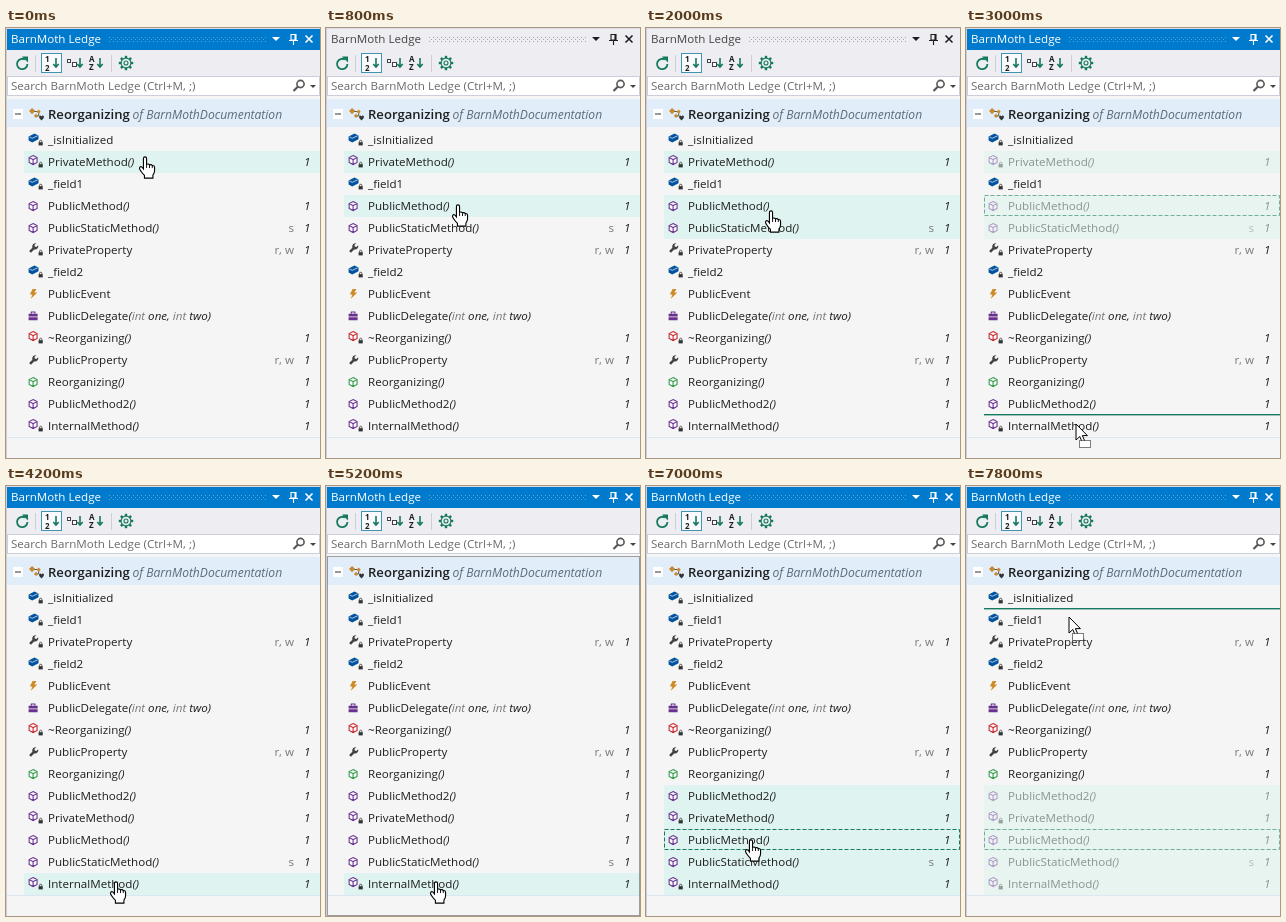
An HTML page for the animation above (8 s loop, 314 by 430 pixels).

```html
<!DOCTYPE html>
<html lang="en">
<head>
<meta charset="utf-8">
<title>Member list</title>
<style>
html, body { margin: 0; width: 100%; height: 100%; overflow: hidden; background: #f5f5f5; }
svg { display: block; width: 100%; height: 100%; }
text { font: 11.6px "Open Sans", sans-serif; fill: #1e1e1e; white-space: pre; }
.i { font-style: italic; }
.type { fill: #777; }
.mid { text-anchor: end; fill: #777; }
</style>
</head>
<body>
<svg id="stage" viewBox="0 0 314 430"></svg>
<script>
const LOOP = 8000, STEP = 200, TOP = 101, PITCH = 22;
const DROP = 4000, READY = 4200;
const PURPLE = '#68308f', TEAL = '#14795f';

const path = (d, fill, stroke = 'none', w = 1) =>
  `<path d="${d}" fill="${fill}" stroke="${stroke}" stroke-width="${w}"/>`;
const rect = (x, y, w, h, fill, more = '') =>
  `<rect x="${x}" y="${y}" width="${w}" height="${h}" fill="${fill}" ${more}/>`;
const text = (x, y, s, more = '') => `<text x="${x}" y="${y}" ${more}>${s}</text>`;
const at = (x, y, s, k = 1) => `<g transform="translate(${x} ${y}) scale(${k})">${s}</g>`;

// Icons
const cube = c => path('M5 .6L9.4 2.8V8.2L5 10.6L.6 8.2V2.8ZM.6 2.8L5 5.2L9.4 2.8M5 5.2V10.6', '#fbfafc', c, 1.2);
const icons = {
  method: cube(PURPLE),
  dtor: cube('#c8262c'),
  ctor: cube('#2f9a4a'),
  field: path('M0 4L6.5 .6L11 2.8V7L4 10.6L0 8.2Z', '#00539c') + path('M1 4.3L4 5.9L10 3.1', 'none', '#d8e8f5', .9),
  prop: path('M1.6 9.8L6 5.4', 'none', '#424242', 2.8) +
    path('M10.6 2.4L8.6 4.4L6.9 4L6.5 2.3L8.5 .4A3.6 3.6 0 0 0 4.2 5L6 7A3.6 3.6 0 0 0 10.6 2.4Z', '#424242'),
  event: path('M4.4 0H8.6L6.4 4H9.6L2.4 11L4.2 6.2H1.4Z', '#d08a24'),
  delegate: path('M0 3H10V6H0ZM0 7H10V10.4H0Z', PURPLE) + path('M3 3V1.2H7V3', 'none', PURPLE, 1.2)
};
const lock = rect(0, 2.4, 4.6, 3.6, '#333') + path('M1 2.6V1.6a1.3 1.3 0 0 1 2.6 0V2.6', 'none', '#333', .9);

// name, suffix, icon, locked, note, count
const members = {
  init: ['_isInitialized', '', 'field', 1],
  priv: ['PrivateMethod', '()', 'method', 1, '', 1],
  f1: ['_field1', '', 'field', 1],
  pub: ['PublicMethod', '()', 'method', 0, '', 1],
  stat: ['PublicStaticMethod', '()', 'method', 0, 's', 1],
  pprop: ['PrivateProperty', '', 'prop', 1, 'r, w', 1],
  f2: ['_field2', '', 'field', 1],
  ev: ['PublicEvent', '', 'event', 0],
  del: ['PublicDelegate', '(int one, int two)', 'delegate', 0],
  dtor: ['~Reorganizing', '()', 'dtor', 1, '', 1],
  prop: ['PublicProperty', '', 'prop', 0, 'r, w', 1],
  ctor: ['Reorganizing', '()', 'ctor', 0, '', 1],
  pub2: ['PublicMethod2', '()', 'method', 0, '', 1],
  int: ['InternalMethod', '()', 'method', 1, '', 1]
};
const before = Object.keys(members);
const moved = ['priv', 'pub', 'stat'];
const after = before.filter(k => !moved.includes(k));
after.splice(-1, 0, ...moved);

// time, x, y of the pointer tip
const track = [
  [0, 139, 129], [200, 138, 133], [800, 132, 177], [1200, 129, 191], [1400, 128, 191],
  [2000, 125, 183], [2200, 123, 188], [2400, 118, 243], [3000, 110, 396], [4000, 110, 396],
  [5000, 110, 396], [5200, 110, 396], [6000, 109, 395], [6600, 104, 315], [6800, 104, 324],
  [7000, 105, 354], [7200, 105, 378], [7800, 103, 131], [8000, 103, 131]
];
function pointer(t) {
  const n = track.findIndex(p => p[0] > t);
  const [a, b] = [track[n - 1], track[n]];
  const u = (t - a[0]) / (b[0] - a[0]);
  return [1, 2].map(j => Math.round(a[j] + (b[j] - a[j]) * u));
}

function selection(t) {
  if (t < DROP) return moved.filter((k, n) => t >= [200, 800, 1400][n]);
  if (t >= 6800) return ['pub2', ...moved, 'int'];
  return [...(t >= 5600 ? ['int'] : []), ...(t >= 6400 ? ['pub2'] : [])];
}

function dashed(t) {
  if (t >= 2200 && t < DROP || t >= 7000) return 'pub';
  return t >= 6400 && t < 6800 ? 'pub2' : '';
}

function titleBar(active) {
  const c = active ? '#fff' : '#1e1e1e';
  const dot = active ? '#59a8de' : '#a3a3a8';
  return `<pattern id="grip" width="4" height="4" x="103" y="9" patternUnits="userSpaceOnUse">` +
    rect(0, 0, 1, 1, dot) + rect(2, 2, 1, 1, dot) + '</pattern>' +
    rect(1, 1, 313, 21, active ? '#007acc' : '#eeeef2') +
    rect(103, 9, 157, 5, 'url(#grip)') +
    text(5, 15, 'BarnMoth Ledge', `style="fill:${active ? c : '#444'}"`) +
    path('M266 9H274L270 13Z', c) +
    path('M285 6.5H290V12H285ZM283 12.5H292M287.5 13V17M289 7V12', 'none', c, 1.1) +
    path('M299.5 7.5L306.5 14.5M306.5 7.5L299.5 14.5', 'none', c, 1.6);
}

const arrow = (x, y) => path(`M${x} ${y}V${y + 9}M${x - 2.7} ${y + 6}L${x} ${y + 9}L${x + 2.7} ${y + 6}`, 'none', TEAL, 1.6);
const glyph = (x, y, s) => text(x, y, s, 'style="font-size:8px;font-weight:700"');
const box = (x, y, s) => rect(x, y, s, s, '#fff', 'stroke="#424242"');
const teeth = [...Array(8)].map((_, n) =>
  `<rect x="-1.2" y="-7.2" width="2.4" height="3" fill="${TEAL}" transform="rotate(${n * 45})"/>`).join('');
const gear = teeth + `<circle r="4.9" fill="#eeeef2" stroke="${TEAL}" stroke-width="1.1"/>` +
  `<circle r="2" fill="none" stroke="${TEAL}" stroke-width="1.1"/>`;

const toolbar = rect(1, 22, 313, 26, '#eeeef2') +
  path('M19 31.6A5.2 5.2 0 1 0 21.4 36', 'none', TEAL, 1.8) + path('M16 28.5H22V34.5Z', TEAL) +
  path('M29.5 27V44M105.5 27V44', 'none', '#cccedb') +
  rect(35.5, 25.5, 20, 19, '#fafafc', 'stroke="#3f96b4"') +
  glyph(39, 34, '1') + glyph(39, 43, '2') + arrow(50, 30) +
  box(61.5, 31.5, 3) + box(66.5, 34.5, 4) + arrow(74, 30) +
  glyph(83, 34, 'A') + glyph(83, 42, 'Z') + arrow(94, 30) + at(120, 35, gear) +
  rect(1.5, 48.5, 312, 19, '#fff', 'stroke="#cccedb"') +
  text(5, 62, 'Search BarnMoth Ledge (Ctrl+M, ;)', 'style="fill:#6a6a6a"') +
  '<circle cx="294.5" cy="56" r="3.6" fill="none" stroke="#555" stroke-width="1.6"/>' +
  path('M292 58.5L287.5 63', 'none', '#555', 2.2) + path('M304 57H310L307 60Z', '#444');

const header = rect(7, 81, 10, 10, '#fff') + path('M9 86H15', 'none', '#333') +
  at(23, 80, path('M3.5 0L7 3.5L3.5 7L0 3.5Z', '#c98a2b') +
    path('M6 4H11V9H8', 'none', '#424242') +
    path('M11 1.8L13.4 4.2L11 6.6L8.6 4.2ZM8 6.6L10.4 9L8 11.4L5.6 9Z', '#c98a2b'), .88) +
  path('M33 88.5q1.5-1.8 2.5 0q1.3-1.8 2.5 0q.4 1.6-2.5 4q-2.9-2.4-2.5-4Z', '#333') +
  text(42, 91, 'Reorganizing', 'style="font-size:13.1px;font-weight:600"') +
  text(126.5, 91, 'of BarnMothDocumentation', 'class="i" style="font-size:12.1px;fill:#5a6b7b"');

function row(key, n, lit, dim, dash) {
  const [name, tail, icon, locked, note, count] = members[key];
  const y = TOP + n * PITCH;
  const args = tail.replace(/int/g, '<tspan class="type">int</tspan>');
  const body = at(22.6, y + (locked ? 4 : 6), icons[icon], .9) + (locked ? at(32.6, y + 11, lock, .9) : '') +
    text(42, y + 15, `${name}<tspan class="i">${args}</tspan>`) +
    (note ? text(288, y + 15, note, 'class="mid"') : '') +
    (count ? text(298, y + 15, count, 'class="i"') : '');
  return (lit ? rect(18, y, 296, PITCH, dim ? '#e8f4f0' : '#dff3f1') : '') +
    `<g opacity="${dim ? .45 : 1}">${body}</g>` +
    (dash ? rect(18.5, y + .5, 295, 20, 'none',
      `stroke="${dim ? '#6fae9c' : TEAL}" stroke-dasharray="4 2"`) : '');
}

const hand = path('M-1.7 13V1.6a1.7 1.7 0 0 1 3.4 0V8q2-1.1 3.2.5q2-.8 3 .8q2.5-.3 2.5 2.3V15q0 2.4-1.8 4.6V23H-.6V20Q-5.4 15-6 12.4Q-5.6 9.4-3.2 11Z', '#fff', '#000', 1.2) +
  path('M1.7 8V12M4.9 8.6V12M7.9 9.4V12', 'none', '#000');
const dragArrow = path('M0 0V16L3.8 12.5L6.2 18.3L8.8 17.2L6.4 11.6H11.4Z', '#fff', '#000') +
  rect(3.5, 16.5, 11, 7, '#fff', 'stroke="#000" stroke-dasharray="1 1"');

function draw(t) {
  const [x, y] = pointer(t);
  const drag = t >= 2200 && t < DROP || t >= 7200;
  const active = t < 200 || t >= 2200 && t < 5600 || t >= 6400;
  const empty = t >= DROP && t < READY;
  const chosen = selection(t), ring = dashed(t);
  const hover = drag ? -1 : Math.floor((y - TOP) / PITCH);
  const order = t < DROP ? before : after;
  let s = rect(0, 0, 314, 430, '#f5f5f5') + rect(0, 0, 314, 1, '#dcdce4') +
    rect(0, 0, 1, 430, '#cccedb') + titleBar(active) + toolbar +
    rect(1, 71, 313, 28, '#e1edf8');
  if (!empty) {
    s += header + order.map((k, n) => {
      const on = chosen.includes(k);
      return row(k, n, on || n === hover, on && drag, k === ring);
    }).join('');
  }
  s += rect(1, 409, 313, 1, '#dbe7f3');
  if (t >= 5000 && t < 5600) {
    s += rect(1.5, 70.5, 312, 359, 'none', 'stroke="#444" stroke-dasharray="1 1"');
  }
  if (drag && t !== 2200 && t !== 7200) {
    s += rect(18, TOP + Math.round((y - TOP) / PITCH) * PITCH - 1, 296, 1.4, TEAL);
  }
  return s + (drag ? at(x, y, dragArrow) : at(x, y, hand, .92));
}

const stage = document.getElementById('stage');
let start = null, shown = -1;
function tick(now) {
  if (start === null) start = now;
  const t = Math.floor((now - start) % LOOP / STEP) * STEP;
  if (t !== shown) stage.innerHTML = draw(shown = t);
  requestAnimationFrame(tick);
}
stage.innerHTML = draw(0);
requestAnimationFrame(tick);
</script>
</body>
</html>
```
